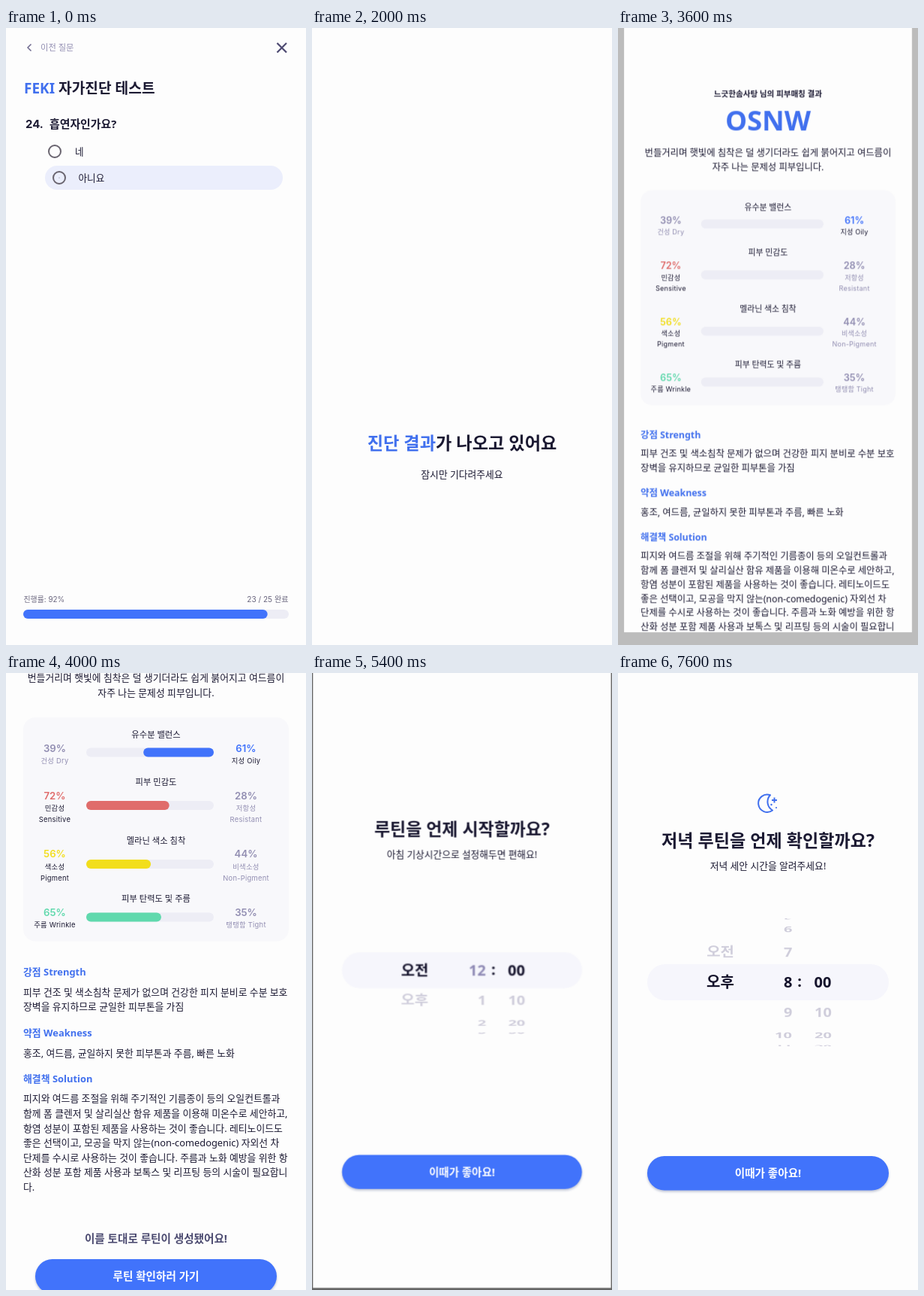
An HTML page for the animation above (8000 ms loop, 400 by 820 pixels).

```html
<!DOCTYPE html>
<html lang="ko">
<head>
<meta charset="utf-8">
<title>Skin test</title>
<style>
html, body { margin: 0; width: 100%; height: 100%; overflow: hidden; background: #fdfdfd; }
#stage { position: absolute; left: 0; top: 0; width: 400px; height: 820px; overflow: hidden; }
.page, .scrim { position: absolute; left: 0; top: -18px; width: 400px; height: 838px; overflow: hidden; }
.page { background: #fdfdfd; }
.scrim { background: #000; opacity: 0; }
.layer { position: absolute; left: 0; top: 18px; width: 400px; height: 820px; }
svg { position: absolute; left: 0; top: 0; width: 400px; height: 820px; overflow: visible; }
svg, .wheel { font-family: 'Noto Sans', 'Noto Sans CJK KR', sans-serif; }
.num { font-family: Inter, 'Noto Sans CJK KR', sans-serif; }
.tag { letter-spacing: .25px; }
.button { filter: drop-shadow(0 2px 1.5px rgba(40, 60, 120, .3)); }
#ring { transform-origin: 200px 373px; }
.view { position: absolute; left: 0; top: 326px; width: 400px; height: 170px; overflow: hidden; color: #cfcddb; }
.band { position: absolute; left: 39px; top: 387px; width: 322px; height: 48px; border-radius: 24px; overflow: hidden; background: #f6f6fc; color: #14122b; }
.wheel { position: absolute; width: 0; height: 0; transform-style: preserve-3d; font-size: 20px; font-weight: 600; line-height: 24px; }
.wheel b { position: absolute; right: 0; top: -12px; font-weight: inherit; white-space: nowrap; backface-visibility: hidden; }
</style>
</head>
<body>
<div id="stage"></div>
<script>
const LOOP = 8000, INK = '#1b1932', BLUE = '#4170ee', FILL = '#4173fb', MUTE = '#928eb2';
const STEP = 28.25, RADIUS = 84.5;
const START = { load: 1620, result: 3512, morning: 5235, evening: 7285 };
let css = '', count = 0;

// Timeline: stops are [ms, declarations, easing]
function loop(sel, ...stops) {
  const all = [[0, ...stops[0].slice(1)], ...stops, [LOOP, stops.at(-1)[1]]];
  const name = 'k' + count++;
  const body = all.map(([ms, rule, ease = 'linear']) =>
    `${(ms / LOOP * 100).toFixed(4)}%{${rule};animation-timing-function:${ease}}`).join('');
  css += `@keyframes ${name}{${body}}${sel}{animation:${name} ${LOOP}ms infinite}`;
}
function show(sel, from, to = LOOP) {
  const stops = [[0, `opacity:${from ? 0 : 1}`, 'step-end']];
  if (from) stops.push([from, 'opacity:1', 'step-end']);
  if (to < LOOP) stops.push([to, 'opacity:0', 'step-end']);
  loop(sel, ...stops);
}
const grow = (at, a, b) => [
  [at, `transform:scale(${a})`, 'cubic-bezier(.05,0,.1333,.06)'],
  [at + 50, `transform:scale(${a + (b - a) * .4})`, 'cubic-bezier(.2083,.82,.25,1)'],
  [at + 300, `transform:scale(${b})`]
];
function enter(id, at, leave) {
  loop('#' + id, [0, 'transform:scale(.85);opacity:0'], ...grow(at, .85, 1),
    [at + 37, 'opacity:0'], [at + 75, 'opacity:1'], ...(leave ? grow(leave, 1, 1.05) : []));
  loop(`#${id}-scrim`, [at + 62, 'opacity:0'], [at + 125, 'opacity:.6'],
    [at + 310, 'opacity:.6', 'step-end'], [at + 311, 'opacity:0']);
}

// y is the visual middle of the line
function text(x, y, size, str, { fill = INK, w = 400, a = 'start', c = '' } = {}) {
  return `<text class="${c}" x="${x}" y="${(y + size * .375).toFixed(2)}" font-size="${size}" font-weight="${w}" fill="${fill}" text-anchor="${a}">${str}</text>`;
}
const mid = (y, size, str, o) => text(200, y, size, str, { a: 'middle', ...o });
const box = (x, y, w, h, r, fill, more = '') =>
  `<rect x="${x}" y="${y}" width="${w}" height="${h}" rx="${r}" fill="${fill}" ${more}/>`;
const blue = str => `<tspan fill="${BLUE}">${str}</tspan>`;
const button = (y, label) => box(39, y, 322, 45.5, 22.7, FILL, 'class="button"') +
  mid(y + 22.5, 14.6, label, { fill: '#fff', w: 700 });
const svg = s => `<svg viewBox="0 0 400 820">${s}</svg>`;
const page = (id, s) => `<div class="scrim" id="${id}-scrim"></div><div class="page" id="${id}"><div class="layer">${s}</div></div>`;

// Questions
function option(y, label, on) {
  return (on ? box(52, y - 16, 317, 32, 16, '#ebeefc') : '') +
    `<circle cx="${on ? 71 : 65}" cy="${y}" r="8" fill="none" stroke="#69646f" stroke-width="2"/>` +
    text(on ? 96.5 : 92, y, 12.6, label);
}
const ask = (n, str) => text(26, 127, 15, n + '.', { w: 700, c: 'num' }) + text(58, 127, 14.9, str, { w: 700 });
function progress(n) {
  const o = { fill: '#6a667e', c: 'num' };
  return `<g id="p${n}">${text(23.5, 759, 9.9, `진행률: ${n * 4}%`, o)}${text(376.5, 759, 10.1, `${n} / 25 완료`, { ...o, a: 'end' })}</g>`;
}
const quiz = svg(
  '<path d="M33.5 21.5L29 26l4.500 4.500" fill="none" stroke="#6f6a8f" stroke-width="1.500"/>' +
  text(46, 26, 11.3, '이전 질문', { fill: MUTE }) +
  '<path d="M361.500 20l12.500 12.500M374 20l-12.500 12.500" stroke="#4d4971" stroke-width="2.200"/>' +
  text(24, 80, 19, 'FEKI', { fill: BLUE, w: 600 }) + text(70, 80, 19.2, '자가진단 테스트', { w: 700 }) +
  `<g id="slide"><g>${ask(24, '흡연자인가요?')}${option(164, '네')}${option(199, '아니요', true)}
    <circle id="dot" cx="71" cy="199" r=".5" fill="#69646f"/></g>
  <g transform="translate(400 0)">${ask(25, '잠이 부족한가요?')}${option(164, '네')}
    <g id="off">${option(199, '아니요')}</g><g id="on">${option(199, '아니요', true)}</g></g></g>` +
  [23, 24, 25].map(progress).join('') +
  box(23, 773, 354, 12, 6, '#ededf5') + box(23, 773, 325.7, 12, 6, FILL, 'id="bar"'));

loop('#quiz', ...grow(START.load, 1, 1.05));
loop('#slide', [170, 'transform:translateX(0px)', 'cubic-bezier(.3,.1,.3,1)'], [490, 'transform:translateX(-400px)']);
loop('#dot', [0, 'r:.5px'], [140, 'r:4px']);
loop('#bar', [180, 'width:325.7px', 'ease-out'], [480, 'width:339.8px'],
  [1000, 'width:339.8px', 'ease-out'], [1300, 'width:354px']);
show('#p23', 0, 180);
show('#p24', 180, 1050);
show('#p25', 1050);
show('#off', 0, 980);
show('#on', 980);

// Loading
const load = svg(
  `<g id="wait"><circle cx="200" cy="373" r="60" fill="none" stroke="#eceef9" stroke-width="8"/>
  <circle id="ring" cx="200" cy="373" r="60" fill="none" stroke="${FILL}" stroke-width="8" stroke-linecap="round" stroke-dasharray="95 400"/></g>` +
  mid(551, 23.2, blue('진단 결과') + '가 나오고 있어요', { w: 700 }) +
  mid(593, 12.8, '잠시만 기다려주세요'));
enter('load', START.load, START.result);
loop('#wait', [2100, 'opacity:0'], [2400, 'opacity:1']);
loop('#ring', [2100, 'transform:rotate(-90deg)'], [3600, 'transform:rotate(450deg)']);

// Result
const SCROLL = 191;
function side(x, y, pct, lines, fill, ink) {
  const o = { a: 'middle', c: 'num' };
  return text(x, y, 13.2, pct + '%', { ...o, fill, w: 600 }) +
    lines.map((s, i) => text(x, y + 16.500 + i * 15, 9.4, s, { ...o, fill: ink, c: 'num tag' })).join('');
}
function trait(i, name, y, barY, left, right, pct, color, flip) {
  const fillAt = flip ? 'transform="matrix(-1 0 0 1 384 0)"' : '';
  loop('#fill' + i, [3620, 'width:0px', 'ease-out'], [4130, `width:${1.7 * pct}px`]);
  const parts = [[65, left, flip ? 100 - pct : pct, !flip], [320, right, flip ? pct : 100 - pct, flip]];
  return mid(y, 11.3, name) + box(107, barY - 6, 170, 12, 6, '#ededf5') +
    box(107, barY - 6, 1.7 * pct, 12, 6, color, `id="fill${i}" ${fillAt}`) +
    parts.map(([x, lines, n, on]) => side(x, y + 18, n, lines, on ? color : MUTE, on ? INK : MUTE)).join('');
}
const head = (y, s) => text(23, y, 12.9, s, { fill: BLUE, w: 600 });
const para = (y, lines) => lines.map((s, i) => text(23, y + i * 19.6, 12.85, s)).join('');
const result = `<div id="scroll">${svg(
  mid(74, 11, '느긋한솜사탕 님의 피부매칭 결과', { w: 600 }) +
  mid(111, 38, 'OSNW', { fill: BLUE, w: 600 }) +
  mid(155.5, 12.85, '번들거리며 햇빛에 침착은 덜 생기더라도 쉽게 붉어지고 여드름이') +
  mid(175, 12.85, '자주 나는 문제성 피부입니다.') +
  `<g transform="translate(0 ${SCROLL})">` +
  box(23, 17, 354, 297.5, 16, '#f8f8fb') +
  trait(0, '유수분 밸런스', 40, 63.5, ['건성 Dry'], ['지성 Oily'], 61, FILL, true) +
  trait(1, '피부 민감도', 103, 134, ['민감성', 'Sensitive'], ['저항성', 'Resistant'], 72, '#e06c6b', false) +
  trait(2, '멜라닌 색소 침착', 180.5, 212, ['색소성', 'Pigment'], ['비색소성', 'Non-Pigment'], 56, '#f2de1c', false) +
  trait(3, '피부 탄력도 및 주름', 258, 282.5, ['주름 Wrinkle'], ['탱탱함 Tight'], 65, '#60d9ad', false) +
  head(355, '강점 Strength') +
  para(382, ['피부 건조 및 색소침착 문제가 없으며 건강한 피지 분비로 수분 보호', '장벽을 유지하므로 균일한 피부톤을 가짐']) +
  head(436, '약점 Weakness') +
  para(463, ['홍조, 여드름, 균일하지 못한 피부톤과 주름, 빠른 노화']) +
  head(497, '해결책 Solution') +
  para(523.5, [
    '피지와 여드름 조절을 위해 주기적인 기름종이 등의 오일컨트롤과',
    '함께 폼 클렌저 및 살리실산 함유 제품을 이용해 미온수로 세안하고,',
    '항염 성분이 포함된 제품을 사용하는 것이 좋습니다. 레티노이드도',
    '좋은 선택이고, 모공을 막지 않는(non-comedogenic) 자외선 차',
    '단제를 수시로 사용하는 것이 좋습니다. 주름과 노화 예방을 위한 항',
    '산화 성분 포함 제품 사용과 보톡스 및 리프팅 등의 시술이 필요합니',
    '다.']) +
  mid(710, 14.6, '이를 토대로 루틴이 생성됐어요!', { fill: '#4b4a70', w: 600 }) +
  button(737, '루틴 확인하러 가기') + '</g>')}</div>`;
enter('result', START.result, START.morning);
loop('#scroll', [3780, 'transform:translateY(0px)', 'cubic-bezier(.3,.3,.3,1)'], [4250, `transform:translateY(${-SCROLL}px)`]);

// Time pickers
const HOURS = [12, 1, 2, 3, 4, 5, 6, 7, 8, 9, 10, 11];
function wheel(cls, items, x, y, pos) {
  const faces = items.map((s, i) =>
    `<b class="i${i}" style="transform:rotateX(${-i * STEP}deg) translateZ(${RADIUS}px)">${s}</b>`).join('');
  return `<div class="wheel ${cls}" style="left:${x}px;top:${y}px;transform:rotateX(${pos * STEP}deg)">${faces}</div>`;
}
function picker(half, hour) {
  const wheels = (dx, y) => wheel('half', ['오전', '오후'], 155 - dx, y, half) +
    wheel('hour', HOURS, 231.5 - dx, y, hour) +
    wheel('minute', ['00', 10, 20, 30, 40, 50], 284.5 - dx, y, 0);
  return `<div class="view">${wheels(0, 85)}</div>
    <div class="band">${wheels(39, 24)}<div class="wheel" style="left:206px;top:23px"><b>:</b></div></div>`;
}
const timePage = (icon, title, sub, half, hour) => `<div class="lift">` +
  svg(`<g class="icon" fill="none" stroke="${BLUE}" stroke-width="2">${icon}</g>` +
    mid(222, 23.1, title, { w: 700 }) + mid(256, 12.8, sub)) +
  picker(half, hour) + '</div>' + svg(button(642, '이때가 좋아요!'));

const rays = Array.from({ length: 8 }, (_, i) => {
  const a = i * Math.PI / 4;
  return `<circle cx="${200 + 14.3 * Math.cos(a)}" cy="${173.5 + 14.3 * Math.sin(a)}" r="1.5" fill="${BLUE}" stroke="none"/>`;
}).join('');
const sun = '<circle cx="200" cy="173.5" r="9.3"/>' + rays;
const moon = '<path d="M203 162.300A11.700 11.700 0 1 0 206 182.500A13 13 0 0 1 203 162.300Z" stroke-linejoin="round"/>' +
  '<path d="M208.500 165.500v7M205 169h7"/>' +
  `<g fill="${BLUE}" stroke="none"><circle cx="204.500" cy="175" r="1.200"/><circle cx="211" cy="179" r="1.100"/></g>`;

function settle(id, at) {
  show(`#${id} .icon`, at);
  loop(`#${id} .lift`, [0, 'transform:translateY(-16px)', 'step-end'], [at, 'transform:translateY(0px)']);
}
enter('morning', START.morning, START.evening);
enter('evening', START.evening);
settle('morning', START.morning + 230);
settle('evening', START.evening + 230);
loop('#morning .hour', [6380, 'transform:rotateX(0deg)', 'cubic-bezier(.35,.25,.35,1)'], [7090, `transform:rotateX(${8 * STEP}deg)`]);
loop('#morning .band .i0', [0, 'color:#8f8ab5', 'step-end'], [5580, 'color:#14122b']);
// The last hours would wrap onto the front of the drum at the start
show('#morning .hour .i10, #morning .hour .i11', 6700);

stage.innerHTML = page('quiz', quiz) + page('load', load) + page('result', result) +
  page('morning', timePage(sun, '루틴을 언제 시작할까요?', '아침 기상시간으로 설정해두면 편해요!', 0, 0)) +
  page('evening', timePage(moon, '저녁 루틴을 언제 확인할까요?', '저녁 세안 시간을 알려주세요!', 1, 8));
// The half-day and minute wheels keep their first item dark
css += '#morning .band .half .i0,#morning .band .minute .i0{animation:none}';
document.head.append(Object.assign(document.createElement('style'), { textContent: css }));
</script>
</body>
</html>
```
